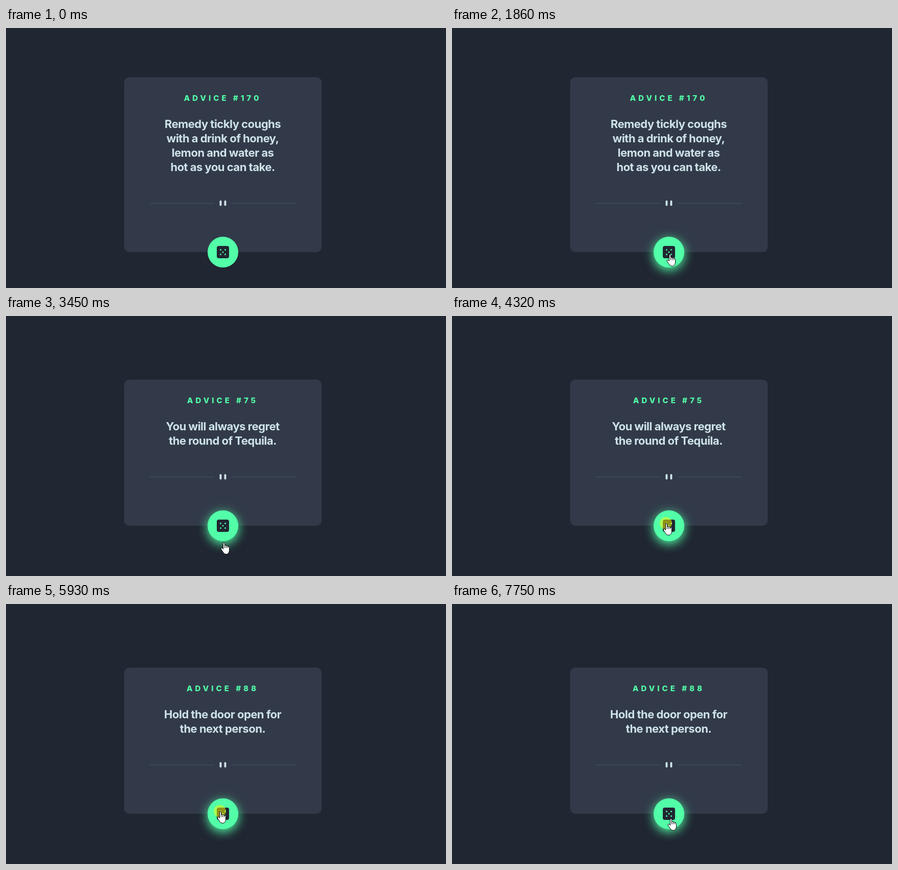
Animation, 860 px wide and 507 px high, one loop 8000 ms. Source, as an HTML page with a canvas:

```html
<!DOCTYPE html>
<html lang="en">
<head>
<meta charset="utf-8">
<title>Advice generator</title>
<style>
  html, body { margin: 0; width: 100%; height: 100%; overflow: hidden; background: #202632; }
  canvas { display: block; }
</style>
</head>
<body>
<canvas id="stage" width="860" height="507"></canvas>
<script>
const ctx = document.getElementById('stage').getContext('2d');
const LOOP = 8000;
const CENTER_X = 424, CENTER_Y = 266.5;
const COLORS = {
  page: '#202632', card: '#323a49', text: '#cee3e9',
  green: '#52ffa8', rule: '#4f5d74', click: 'rgba(255,255,0,.5)'
};

const ADVICE = [
  { from: 0, id: 170, lines: ['Remedy tickly coughs', 'with a drink of honey,', 'lemon and water as', 'hot as you can take.'] },
  { from: 2390, id: 75, lines: ['You will always regret', 'the round of Tequila.'] },
  { from: 4590, id: 88, lines: ['Hold the door open for', 'the next person.'] }
];

// Each row: time, then the values at that time
const POINTER = [
  [710, 494, 485], [900, 447, 458], [1190, 425, 441],
  [3450, 425, 441], [3660, 418, 404],
  [6900, 418, 404], [7000, 420, 425], [7060, 424, 442], [7260, 431, 468],
  [7340, 431, 488], [7400, 431, 480], [7500, 429, 440], [7680, 427, 418]
];
const GLOW = [[890, 0], [1150, 1], [7040, 1], [7240, 0], [7470, 0], [7670, 1]];
const CLICKS = [[1720, 1860], [4320, 4390], [5930, 6060]];
const HAND_TIMES = [[890, 7080], [7480, LOOP]];

const ARROW = new Path2D('M0 0V16L4 12.5L6.3 18L8.5 17L6.2 12H11.5Z');
const HAND = new Path2D('M-1 1.5a1.5 1.5 0 0 1 3 0V6Q4 5 5 6.5Q7 6 8 7.5Q10.5 7.5 11 10V15.5' +
  'Q10.5 23 4.5 23Q.5 23-1.5 18.5L-5 13.5Q-6 10.7-4 10.5Q-2.5 10.8-1 13Z');
const KNUCKLES = new Path2D('M2 6V11M5 6.5V11M8 7.5V11');

function track(rows, t) {
  const next = rows.findIndex(row => row[0] > t);
  if (next === 0) return rows[0].slice(1);
  if (next < 0) return rows.at(-1).slice(1);
  const a = rows[next - 1], b = rows[next];
  const k = (t - a[0]) / (b[0] - a[0]);
  return a.slice(1).map((v, i) => v + (b[i + 1] - v) * k);
}

const during = (spans, t) => spans.some(([from, to]) => t >= from && t < to);

function roundRect(x, y, w, h, r, color) {
  ctx.fillStyle = color;
  ctx.beginPath();
  ctx.roundRect(x, y, w, h, r);
  ctx.fill();
}

function disc(x, y, r, color) {
  ctx.fillStyle = color;
  ctx.beginPath();
  ctx.arc(x, y, r, 0, 2 * Math.PI);
  ctx.fill();
}

function label(text, y, font, spacing, color) {
  ctx.font = font;
  ctx.letterSpacing = spacing + 'px';
  ctx.fillStyle = color;
  ctx.fillText(text, CENTER_X - .5, y);
}

function drawDivider(y) {
  ctx.fillStyle = COLORS.rule;
  for (const x of [281, 440.7]) ctx.fillRect(x, y - .35, 126.3, .7);
  for (const x of [417.5, 426.5]) roundRect(x, y - 5.8, 3.9, 10.6, 1.9, COLORS.text);
}

function drawButton(y, glow, halo) {
  if (halo)
    for (const r of [45, 40]) disc(CENTER_X, y + 4, r, 'rgba(82,255,168,.03)');
  ctx.save();
  ctx.shadowColor = `rgba(82,255,168,${glow})`;
  ctx.shadowBlur = 20;
  ctx.shadowOffsetY = 5;
  disc(CENTER_X, y, 30, COLORS.green);
  ctx.restore();
  roundRect(CENTER_X - 12, y - 12, 24, 24, 4, COLORS.page);
  disc(CENTER_X, y, 1.5, COLORS.green);
  for (const dx of [-4.5, 4.5])
    for (const dy of [-4.5, 4.5]) disc(CENTER_X + dx, y + dy, 1.5, COLORS.green);
}

function drawPointer(t) {
  const [x, y] = track(POINTER, t).map(Math.round);
  if (during(CLICKS, t)) disc(x, y, 12, COLORS.click);
  const isHand = during(HAND_TIMES, t);
  const shape = isHand ? HAND : ARROW;
  ctx.save();
  ctx.translate(x + .5, y + .5);
  ctx.fillStyle = '#fff';
  ctx.strokeStyle = '#000';
  ctx.lineWidth = 1;
  ctx.fill(shape);
  ctx.stroke(shape);
  if (isHand) ctx.stroke(KNUCKLES);
  ctx.restore();
}

function draw(t) {
  const { id, lines } = ADVICE.findLast(item => t >= item.from);
  const height = 229 + 28 * lines.length;
  const top = CENTER_Y - height / 2, bottom = top + height;

  ctx.fillStyle = COLORS.page;
  ctx.fillRect(0, 0, 860, 507);
  roundRect(231, top, 386, height, 10, COLORS.card);
  ctx.textAlign = 'center';
  label('ADVICE #' + id, top + 46, '800 15px Inter, sans-serif', 5, COLORS.green);
  lines.forEach((line, i) =>
    label(line, top + 99 + 28 * i, '700 22px Inter, sans-serif', -.52, COLORS.text));
  drawDivider(bottom - 95);
  drawButton(bottom, track(GLOW, t)[0], t >= 2390 && t < 3450);
  if (t >= 710) drawPointer(t);
}

function frame() {
  draw(performance.now() % LOOP);
  requestAnimationFrame(frame);
}
frame();
</script>
</body>
</html>
```
